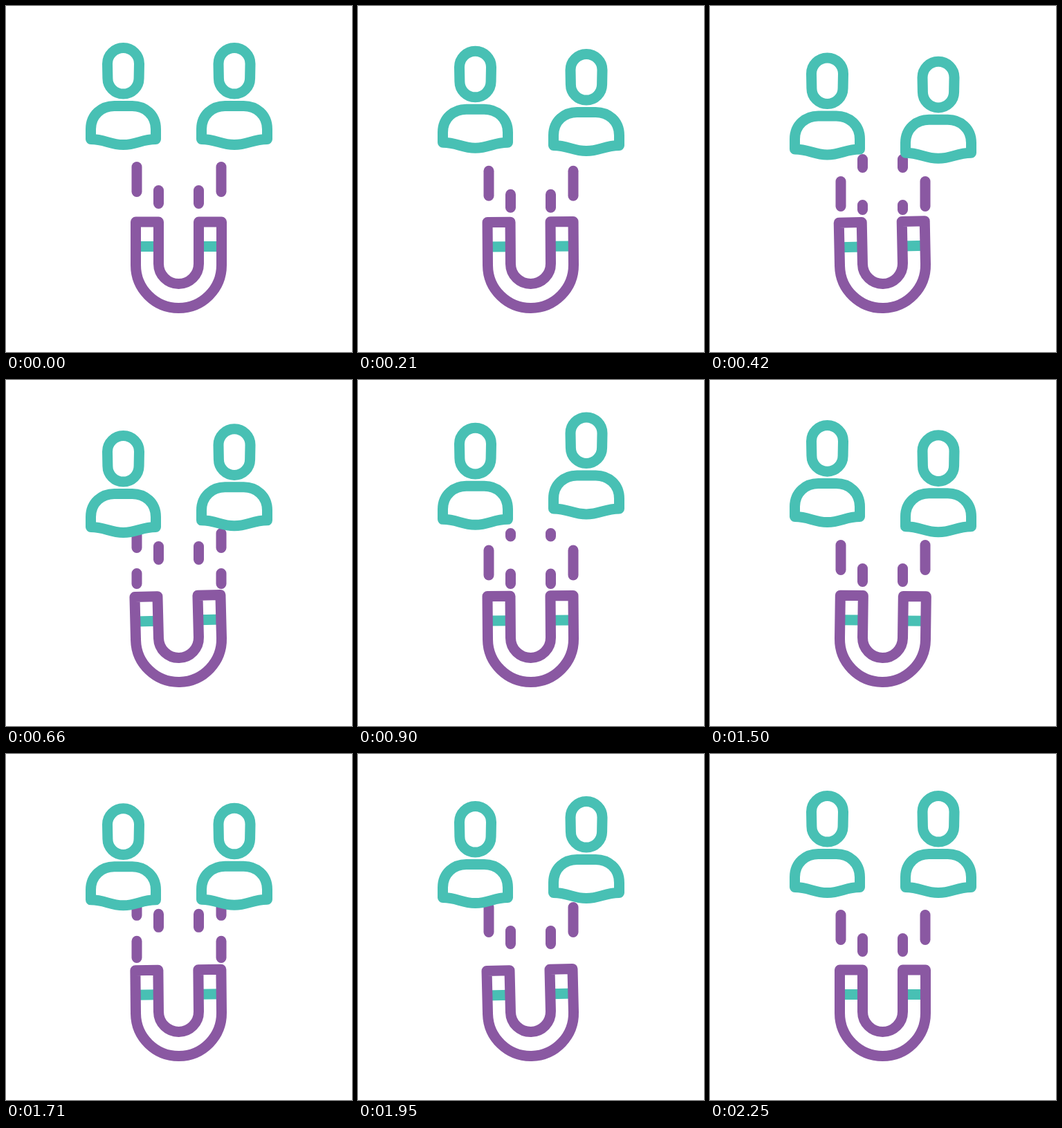
Animation, 500 px wide and 500 px high, one loop 2340 ms. Source, as an HTML page with a canvas:

```html
<!DOCTYPE html>
<html lang="en">
<head>
<meta charset="utf-8">
<title>Magnet and people</title>
<style>
  html, body { margin: 0; width: 100%; height: 100%; overflow: hidden; background: #fff; }
  canvas { display: block; width: 500px; height: 500px; }
</style>
</head>
<body>
<canvas id="stage" width="500" height="500"></canvas>
<script>
const ctx = document.getElementById('stage').getContext('2d');
const TEAL = '#48c0b4', PURPLE = '#8a58a2';
const LOOP = 2340, STEP = 30, LAST = 2250;
const LANE_TOP = 221.5, LANE = 73;

// Keys are [time, value].
const leftBob = [[0, 0], [650, 20], [1225, -8], [1800, 20], [2250, 0]];
const rightBob = [[0, 0], [450, 20], [975, -8], [1560, 20], [2250, 0]];
const tilt = [[0, 0], [600, -1.5], [1320, 1.3], [1940, -1.4], [2250, 0]];
const travel = [[0, 0], [420, 21], [900, 86.5], [1260, 177], [1500, 225], [1950, 281], [2250, 292]];

function segment(keys, t) {
  let i = 0;
  while (i < keys.length - 2 && t >= keys[i + 1][0]) i++;
  return i;
}

// Swings between the keys, resting at each one.
function swing(keys, t) {
  const i = segment(keys, t);
  const [t0, v0] = keys[i], [t1, v1] = keys[i + 1];
  return v0 + (v1 - v0) * (1 - Math.cos(Math.PI * (t - t0) / (t1 - t0))) / 2;
}

// Smooth curve through the keys, resting only at both ends.
function flow(keys, t) {
  const rate = i => (keys[i + 1][1] - keys[i][1]) / (keys[i + 1][0] - keys[i][0]);
  const slope = i => {
    if (i === 0 || i === keys.length - 1) return 0;
    const before = keys[i][0] - keys[i - 1][0], after = keys[i + 1][0] - keys[i][0];
    return (rate(i - 1) * after + rate(i) * before) / (before + after);
  };
  const i = segment(keys, t);
  const [t0, v0] = keys[i], [t1, v1] = keys[i + 1];
  const h = t1 - t0, s = (t - t0) / h, r = 1 - s;
  return v0 * (1 + 2 * s) * r * r + v1 * s * s * (3 - 2 * s)
    + h * s * r * (slope(i) * r - slope(i + 1) * s);
}

function line(x0, y0, x1, y1) {
  ctx.beginPath();
  ctx.moveTo(x0, y0);
  ctx.lineTo(x1, y1);
  ctx.stroke();
}

function drawPerson(x, y, half) {
  ctx.save();
  ctx.translate(x, y);
  ctx.strokeStyle = TEAL;

  ctx.beginPath();
  ctx.arc(0, 83.5, 23, Math.PI, 0);
  ctx.arc(0, 104.5, 22.6, 0, Math.PI);
  ctx.closePath();
  ctx.stroke();

  ctx.beginPath();
  ctx.moveTo(-half, 192.5);
  ctx.lineTo(-half, 178);
  ctx.bezierCurveTo(-half, 157, 16 - half, 144.5, 34 - half, 144.5);
  ctx.lineTo(half - 34, 144.5);
  ctx.bezierCurveTo(half - 16, 144.5, half, 157, half, 178);
  ctx.lineTo(half, 192.5);
  ctx.bezierCurveTo(26, 192.5, 20, 200.5, 0, 200.5);
  ctx.bezierCurveTo(-20, 200.5, -26, 192.5, -half, 192.5);
  ctx.closePath();
  ctx.stroke();
  ctx.restore();
}

function drawDash(x, start, length) {
  ctx.setLineDash([length, LANE - length]);
  ctx.lineDashOffset = -start;
  line(x, LANE_TOP, x, LANE_TOP + LANE);
  ctx.setLineDash([]);
}

function drawMagnet(degrees) {
  ctx.save();
  ctx.translate(249.5, 373.5);
  ctx.rotate(degrees * Math.PI / 180);

  ctx.lineCap = 'butt';
  ctx.strokeStyle = TEAL;
  line(-62, -26, -29, -26);
  line(29, -26, 62, -26);

  ctx.strokeStyle = PURPLE;
  ctx.beginPath();
  ctx.moveTo(-62, -61.5);
  ctx.lineTo(-62, 1);
  ctx.arc(0, 1, 62, Math.PI, 0, true);
  ctx.lineTo(62, -61.5);
  ctx.lineTo(29, -61.5);
  ctx.lineTo(29, -1);
  ctx.arc(0, -1, 29, 0, Math.PI);
  ctx.lineTo(-29, -61.5);
  ctx.closePath();
  ctx.stroke();
  ctx.restore();
}

function draw(t) {
  ctx.fillStyle = '#fff';
  ctx.fillRect(0, 0, 500, 500);
  ctx.lineWidth = 15;
  ctx.lineJoin = ctx.lineCap = 'round';

  const shift = flow(travel, t);
  ctx.strokeStyle = PURPLE;
  for (const x of [189, 311]) drawDash(x, 11 + shift, 36);
  for (const x of [220.5, 278.5]) drawDash(x, 45 + shift, 19);

  drawMagnet(swing(tilt, t));
  drawPerson(169.5, swing(leftBob, t), 47);
  drawPerson(330, swing(rightBob, t), 47.5);
}

const begin = performance.now();
function tick() {
  const t = (performance.now() - begin) % LOOP;
  draw(Math.min(Math.floor(t / STEP) * STEP, LAST));
  requestAnimationFrame(tick);
}
tick();
</script>
</body>
</html>
```
